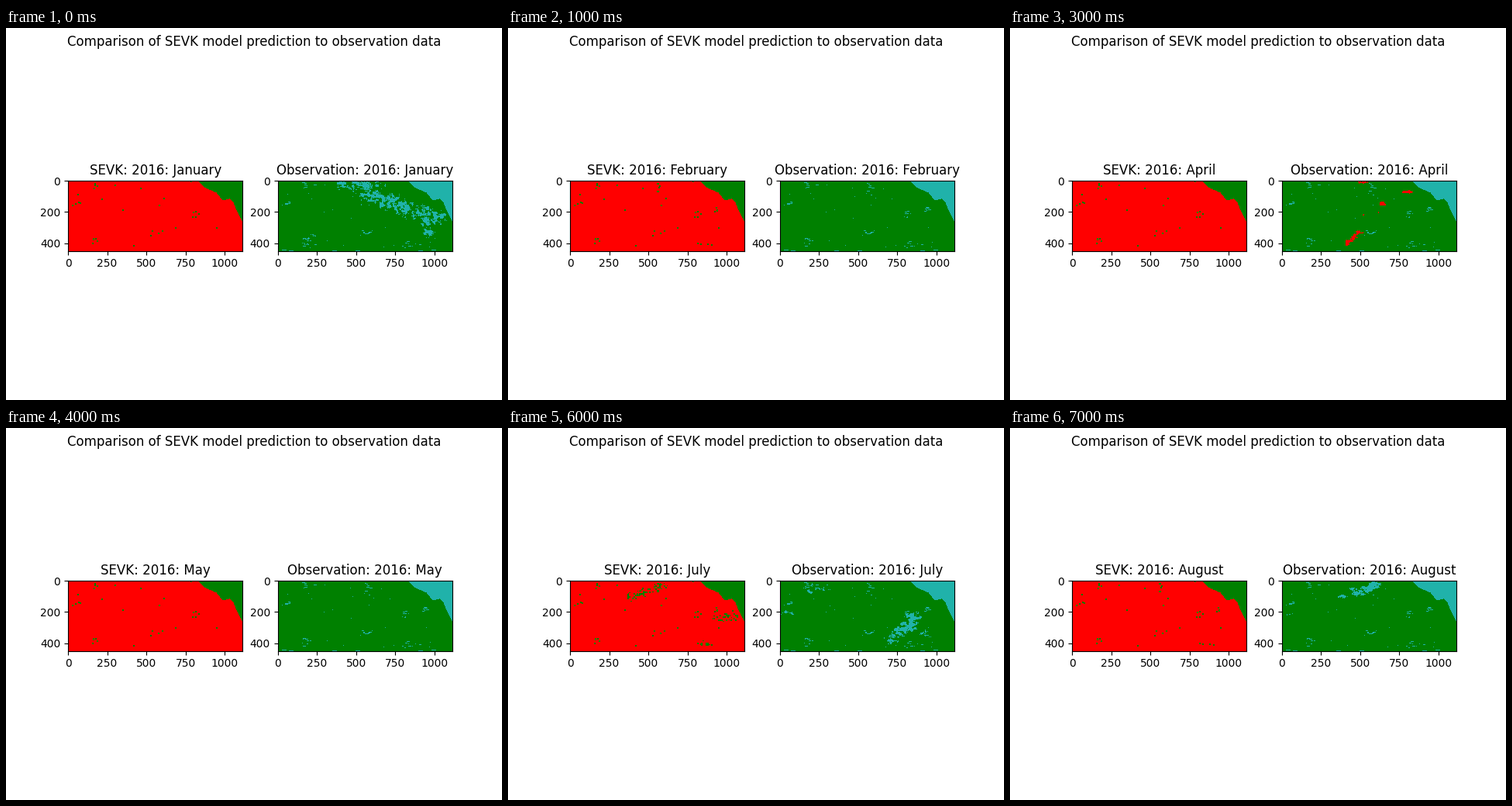
Write a matplotlib script that moves like this. It is 640x480 px and loops after 8000 ms.

```python
import matplotlib.pyplot as plt
import numpy as np
from matplotlib.animation import FuncAnimation
from matplotlib.colors import ListedColormap

RED, GREEN, TEAL = 0, 1, 2
CMAP = ListedColormap(["red", "green", "lightseagreen"])
MODEL = "SEVK"
MONTHS = ["January", "February", "March", "April",
          "May", "June", "July", "August"]
DRY = {"January", "April", "May"}
W, H = 225, 91
YY, XX = np.mgrid[0:H, 0:W]
PIXEL = 0.72  # one pixel in points

# Coastline key points from the top edge to the right edge
COAST = [(166, 0), (176, 9), (190, 15), (198, 25),
         (207, 23), (212, 28), (216, 38), (225, 56)]
SEA = (YY < np.interp(XX, *zip(*COAST))) & (XX > 166)

# Lake groups: centre and spread; the last ones dry up in the model
LAKES = [(37, 75, 3, 4), (11, 30, 3, 1), (162, 43, 2, 4), (112, 66, 4, 3),
         (38, 6, 4, 2), (115, 9, 2, 4), (188, 35, 2, 3), (162, 82, 9, 2)]
LASTING = 5


def along(start, end, n, rx, ry, cover):
    """Equal spots in a row between two points."""
    return [(x, y, rx, ry, cover) for x, y in np.linspace(start, end, n)]


# Spots: x, y, x radius, y radius, coverage
FLOOD = {
    "January": along((85, 4), (125, 8), 4, 9, 6, .55)
    + along((120, 20), (200, 46), 5, 13, 8, .65)
    + along((190, 52), (194, 67), 2, 7, 6, .6)
    + [(38, 77, 9, 8, .2)],
    "July": along((145, 74), (172, 48), 4, 9, 6, .55)
    + [(165, 60, 10, 6, .75), (45, 9, 14, 6, .25), (12, 41, 8, 4, .3),
       (187, 69, 6, 5, .35)],
    "August": along((100, 15), (117, 5), 3, 8, 4, .75)
    + along((78, 20), (92, 11), 2, 7, 2, .4) + [(12, 42, 8, 2, .4)],
}
THAW = (along((80, 20), (118, 6), 4, 7, 4, .4)
        + along((190, 48), (210, 47), 3, 6, 4, .45)
        + [(174, 80, 8, 4, .4)])
FIRE = (along((83, 81), (98, 66), 6, 4, 2, .9)
        + [(103, 1, 6, 2, .9), (160, 14, 6, 2, .9), (129, 29, 4, 3, .9),
           (105, 44, 2, 1, .9), (123, 41, 1, 2, .9)])


def patches(spots, seed, cell=1):
    """Mask of ragged spots, with coverage falling off from each centre."""
    rng = np.random.default_rng(seed)
    noise = rng.random((H // cell + 1, W // cell + 1))
    if cell == 1:
        noise = sum(np.roll(noise, (j, i), (0, 1))
                    for j in (-1, 0, 1) for i in (-1, 0, 1, 2))
    rank = noise.ravel().argsort().argsort().reshape(noise.shape) / noise.size
    rank = np.kron(rank, np.ones((cell, cell)))[:H, :W]
    cover = np.zeros((H, W))
    for x, y, rx, ry, amount in spots:
        dist = ((XX - x) / rx) ** 2 + ((YY - y) / ry) ** 2
        cover = np.maximum(cover, amount * np.exp(-.7 * dist ** 2))
    return rank < cover


def lake_points(count=8):
    """Points around each lake group, as one array per group."""
    rng = np.random.default_rng(4)
    return [np.clip(rng.normal((x, y), (sx, sy), (count, 2)),
                    0, (W - 3, H - 2)).astype(int)
            for x, y, sx, sy in LAKES]


PONDS = np.random.default_rng(12).integers((0, 0), (200, H - 1), (26, 2))
SHORES = lake_points()


def model_map(month):
    groups = SHORES[:LASTING] if month in DRY else SHORES
    cells = np.vstack([g[::2] for g in groups] + [PONDS[::2]])
    grid = np.full((H, W), RED)
    for x, y in cells:
        grid[y:y + 2, x:x + 2] = GREEN
    if month == "July":
        grid[patches(THAW, 3, 2)] = GREEN
    grid[SEA] = GREEN
    return grid


def observed_map(month):
    grid = np.full((H, W), GREEN)
    for k, (x, y) in enumerate(np.vstack(SHORES)):
        grid[y, x:x + 1 + k % 4] = TEAL
    grid[PONDS[:, 1], PONDS[:, 0]] = TEAL
    # Shallow water along the bottom edge
    for x in (5, 14, 70, 100, 180, 197):
        grid[-1 - x % 2, x:x + 6] = TEAL
    if month in FLOOD:
        grid[patches(FLOOD[month], len(month))] = TEAL
    if month == "April":
        grid[patches(FIRE, 8)] = RED
    grid[SEA] = TEAL
    return grid


fig, axes = plt.subplots(1, 2, figsize=(6.4, 4.8), dpi=100)
fig.suptitle(f"Comparison of {MODEL} model prediction to observation data",
             y=.98 + 1 / 480)
panels = [(MODEL, model_map), ("Observation", observed_map)]
images = [ax.imshow(np.zeros((H, W)), cmap=CMAP, vmin=0, vmax=2,
                    interpolation="nearest",
                    extent=(-.5, 1115.5, 449.5, -.5)) for ax in axes]
for ax in axes:
    ax.tick_params(axis="x", pad=3.5 - PIXEL)


def update(i):
    month = MONTHS[i]
    for ax, image, (name, build) in zip(axes, images, panels):
        image.set_data(build(month))
        ax.set_title(f"{name}: 2016: {month}")
    return images


anim = FuncAnimation(fig, update, frames=len(MONTHS), interval=1000,
                     repeat=True, repeat_delay=0)
plt.show()
```
